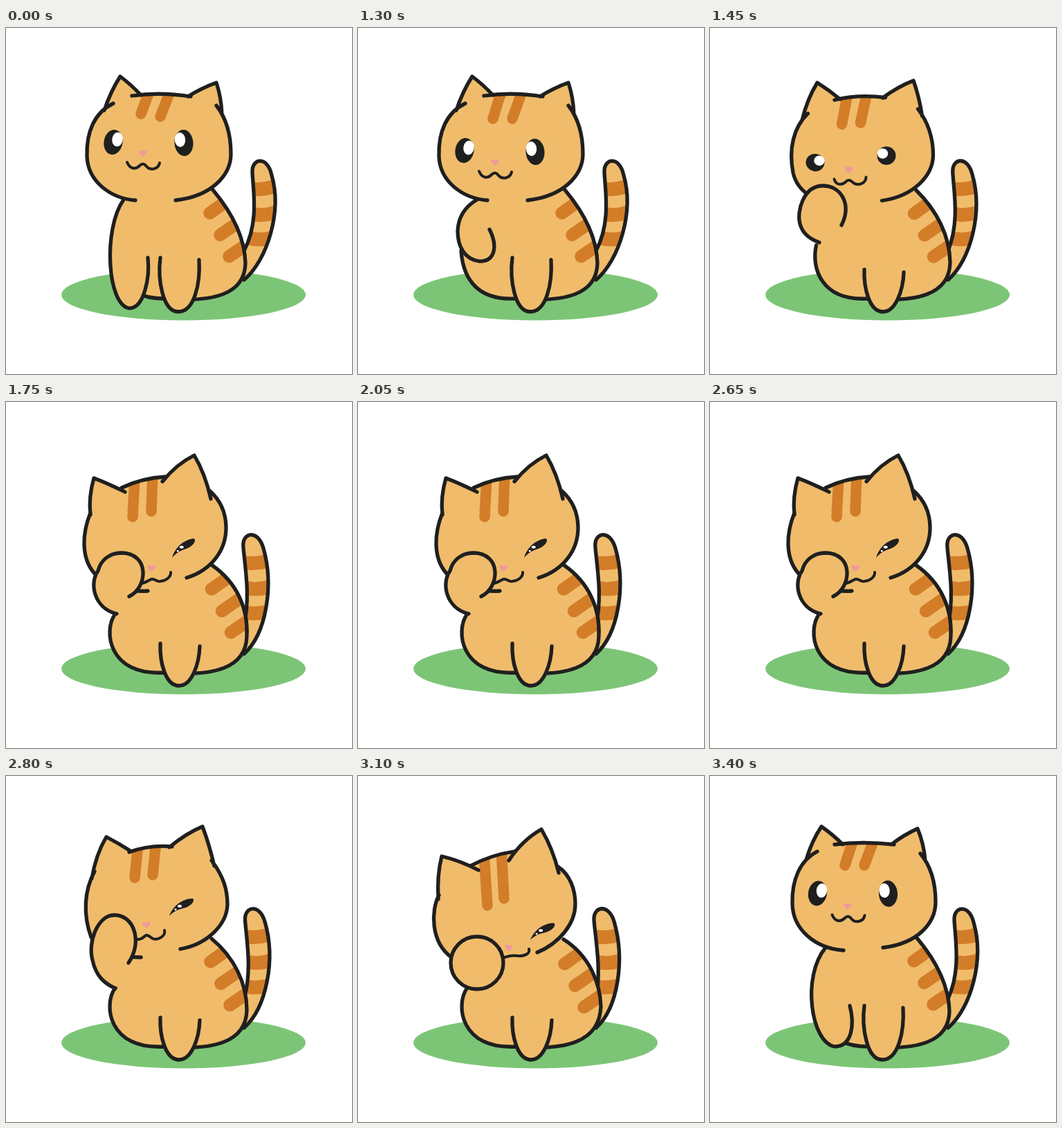
Animation, 500 px wide and 500 px high, one loop 3.55 s. Source, as an HTML page:

```html
<!DOCTYPE html>
<html lang="en">
<head>
<meta charset="utf-8">
<title>Washing cat</title>
<style>
  html, body { margin: 0; width: 100%; height: 100%; overflow: hidden; background: #fff; }
  svg { display: block; width: 100%; height: 100%; }
  .fur { fill: #f0bc6b; }
  .line { fill: none; stroke: #1f1f1f; stroke-width: 5.3; stroke-linecap: round; stroke-linejoin: round; }
  .stripe { fill: none; stroke: #d37d28; stroke-width: 18.5; stroke-linecap: round; }
  .dark { fill: #1f1f1f; }
  .white { fill: #fff; }
</style>
</head>
<body>
<svg id="stage" viewBox="0 0 500 500"></svg>
<script>
const HOLD = 1300, STEP = 150, LOOP = 3550;

// Blend two paths of the same structure, number by number.
function mix(a, b, k) {
  const goal = b.match(/-?[\d.]+/g);
  let i = 0;
  return a.replace(/-?[\d.]+/g, n => +(+n + (goal[i++] - n) * k).toFixed(2));
}

function shift(path, dx, dy) {
  let i = 0;
  return path.replace(/-?[\d.]+/g, n => +n + (i++ % 2 ? dy : dx));
}

const tailUp = "M344 364C378 335 399 265 384 213C378 184 355 188 356 208C357 235 366 280 344 322";
const tailBent = "M344 364C376 335 386 265 370 210C362 184 340 188 341 208C343 235 352 280 344 322";
const sitLeg = "M223 332C219 362 226 410 249 410C272 410 281 370 279 335";
const washLeg = "M223 349C222 375 230 410 250 410C268 410 279 380 280 353";
const smile = "M175 194C179 204 187 205 193 199C197 195 200 196 203 200C208 206 220 205 222 195";

// head: left cheek, left ear, crown, right ear, right cheek
const sit = {
  head: "M187 249C150 246 118 221 117 185C116 150 128 122 155 109" +
        "M142 119Q151 92 165 70Q181 82 195 97M182 98Q222 92 267 99" +
        "M263 99Q282 87 304 79Q311 100 312 124" +
        "M304 112C318 130 325 153 325 182C325 212 298 243 245 249",
  marks: "M207 92L195 124M237 92L223 128",
  body: "M160 300C155 340 160 391 228 391C300 397 345 385 346 340C345 300 325 265 299 234",
  arm: "M205 332C208 360 200 405 178 405C146 400 140 290 170 248",
  leg: sitLeg, mouth: smile, nose: "198 181 0", eyes: "155 165 257 166",
  open: 1, bend: 0, lean: "0 0"
};

const raise = {
  ...sit,
  marks: "M207 92L195 131M237 92L223 131",
  body: "M149 322C152 365 175 394 228 391C300 397 345 385 346 340C345 300 325 265 299 234",
  arm: "M190 291C203 317 197 338 175 337C154 334 144 316 144 293C145 272 155 258 172 248",
  mouth: shift(smile, 0, 13), nose: "198 194 0", eyes: "154 177 256 179"
};

const settle = {
  ...sit,
  head: "M193 252C152 249 120 222 119 185C118 150 130 122 155 109" +
        "M139 121Q147 94 161 73Q178 85 192 99M180 99Q220 94 266 99" +
        "M262 99Q280 85 300 76Q309 98 311 122" +
        "M304 112C319 130 326 153 326 182C326 212 301 242 250 248",
  marks: "M207 92L195 129M237 92L223 129",
  arm: "M202 332C209 358 206 391 180 391C146 385 132 290 167 248",
  mouth: shift(smile, 1.5, 6.5), nose: "199 188 0", eyes: "155.5 169.5 257.5 170",
  bend: .2
};

const washUp = {
  head: "M195 262C160 262 135 255 123 233C111 200 113 165 128 138" +
        "M124 148Q130 113 145 88Q164 98 181 109M178 110Q208 99 240 102" +
        "M236 103Q260 83 284 73Q294 100 301 130" +
        "M297 122C315 146 320 165 320 186C319 214 292 243 252 250",
  marks: "M191 98L186 147M217 94L212 143",
  body: "M158 306C140 330 148 396 228 391C300 397 347 385 348 338C348 300 330 262 297 235",
  arm: "M177 270C198 240 185 200 156 201C132 202 118 240 125 266C130 290 143 300 158 307",
  leg: washLeg,
  mouth: "M184 230C186 240 196 236 201 231C205 228 208 233 212 235C220 238 231 231 229 223",
  nose: "203 215 0", eyes: "150 212 254 190", wink: [237, 201, 0],
  open: .4, bend: .7, lean: "1 1", armOnTop: true
};

const washMid = {
  ...washUp,
  head: "M205 273C165 275 145 265 128 248C108 225 110 190 122 160" +
        "M122 163Q119 138 127 110Q148 118 172 130M167 124Q196 110 230 108" +
        "M226 115Q246 90 272 77Q288 104 296 140" +
        "M294 128C310 142 318 160 318 182C318 214 297 243 261 254",
  marks: "M186 110L183 166M212 102L210 158",
  body: "M158 306C140 330 148 396 228 391C300 397 347 385 348 338C350 300 335 262 298 236",
  arm: "M178 281C205 268 208 219 167 218C150 218 137 228 133 244C120 262 127 298 160 306",
  mouth: "M190 258C194 266 202 260 208 257C213 254 215 258 220 259C228 260 239 254 238 246",
  nose: "210 240 5", wink: [241, 224, -5], bend: .88, lean: "2.5 3"
};

const washDown = {
  ...washMid,
  head: "M190 270C165 270 150 268 135 262C105 240 105 195 117 172" +
        "M116 178Q114 143 121 116Q147 122 174 136M162 130Q192 114 226 109" +
        "M218 122Q237 93 265 77Q282 106 290 140" +
        "M289 131C307 143 314 165 314 185C314 213 292 241 259 255",
  marks: "M182 112L187 187M207 104L211 177",
  body: "M158 306C140 330 148 396 228 391C300 397 349 385 351 333C350 300 335 260 297 236",
  arm: "M134 270A38 38 0 0 1 210 270A38 38 0 0 1 134 270",
  mouth: "M205 262C209 264 214 261 220 260C226 259 229 260 234 260C242 260 249 256 247 250",
  nose: "218 248 8", wink: [250, 236, 1], bend: 1, lean: "4 4"
};

function between(a, b, k) {
  const pose = { ...b, wink: null };
  for (const part of ["head", "marks", "body", "mouth", "nose", "eyes", "lean"])
    pose[part] = mix(a[part], b[part], k);
  for (const value of ["open", "bend"]) pose[value] = a[value] + (b[value] - a[value]) * k;
  pose.arm = "M190 285C205 255 190 228 163 228C135 228 125 265 130 283C134 298 145 305 158 310";
  return pose;
}

const washing = [washUp, washMid, washDown, washMid];
const sequence = [sit, raise, between(raise, washUp, .5),
  ...washing, ...washing, ...washing.slice(0, 3),
  between(settle, washUp, .5), settle];

const draw = (kind, d, extra = "") => `<path class="${kind}" d="${d}" ${extra}/>`;
const shape = d => draw("fur", d) + draw("line", d);
const clip = (id, d) => `<clipPath id="${id}"><path d="${d}"/></clipPath>`;
const oval = (kind, x, y, rx, ry, tilt = 0) =>
  `<ellipse class="${kind}" cx="${x}" cy="${y}" rx="${rx}" ry="${ry}" transform="rotate(${tilt} ${x} ${y})"/>`;

function openEyes({ eyes, open }) {
  const [lx, ly, rx, ry] = eyes.match(/[\d.]+/g).map(Number);
  return oval("dark", lx, ly, 13.5, 18 * open, 10) +
    oval("white", lx + 6, ly - 4 * open, 7.7, 10.3 * open, 8) +
    oval("dark", rx, ry, 13.5, 19 * open, -4) +
    oval("white", rx - 5.5, ry - 4.5 * open, 7.7, 10.5 * open, -4);
}

function winkingEye([x, y, angle]) {
  return `<g transform="translate(${x} ${y}) rotate(${angle})">` +
    draw("dark", "M-1 1C4 -13 18 -24 33 -24C37 -19 28 -12 20 -10C11 -8 5 -5 -1 1Z") +
    oval("white", 14, -13, 3, 2) + oval("white", 8, -8, 1.6, 1.4) + "</g>";
}

function tail(bend) {
  const d = mix(tailUp, tailBent, bend);
  return clip("tail", d) + draw("fur", d) +
    `<g clip-path="url(#tail)">` +
    draw("stripe", "M345 231Q372 237 398 225M345 266Q372 276 400 262M335 296Q362 314 398 298",
      `transform="translate(${-9 * bend} 0)" style="stroke-width:20"`) +
    "</g>" + draw("line", d);
}

function body({ body, lean }) {
  const filled = body + "L170 240Z";
  return clip("body", filled) + draw("fur", filled) +
    `<g clip-path="url(#body)">` +
    draw("stripe", "M322 248L294.5 267.5M340 278L309.5 299M352 310L322.5 330", `transform="translate(${lean})"`) +
    "</g>" + draw("line", body);
}

function head(pose) {
  const filled = pose.head[0] + pose.head.slice(1).replace(/M/g, "L") + "Z";
  return clip("head", filled) + draw("fur", filled) +
    `<g clip-path="url(#head)">${draw("stripe", pose.marks, 'style="stroke-width:15.5"')}</g>` +
    draw("line", pose.head) +
    (pose.wink ? winkingEye(pose.wink) : openEyes(pose)) +
    draw("line", pose.mouth, 'style="stroke-width:4"') + nose(pose.nose);
}

function nose(place) {
  const [x, y, angle] = place.split(" ");
  return `<path fill="#f09a98" d="M0 5C-9 -1 -6 -7 0 -3C6 -7 9 -1 0 5Z"
    transform="translate(${x} ${y}) rotate(${angle})"/>`;
}

function cat(pose) {
  const arm = shape(pose.arm);
  return `<ellipse cx="256.5" cy="385.5" rx="176.5" ry="37" fill="#7cc576"/>` +
    tail(pose.bend) + body(pose) + shape(pose.leg) +
    (pose.armOnTop ? head(pose) + arm : arm + head(pose));
}

const stage = document.getElementById("stage");
const start = performance.now();
let shown = -1;

function tick() {
  const t = (performance.now() - start) % LOOP;
  const index = t < HOLD ? 0 : 1 + Math.floor((t - HOLD) / STEP);
  if (index !== shown) {
    stage.innerHTML = cat(sequence[index]);
    shown = index;
  }
  requestAnimationFrame(tick);
}
tick();
</script>
</body>
</html>
```
